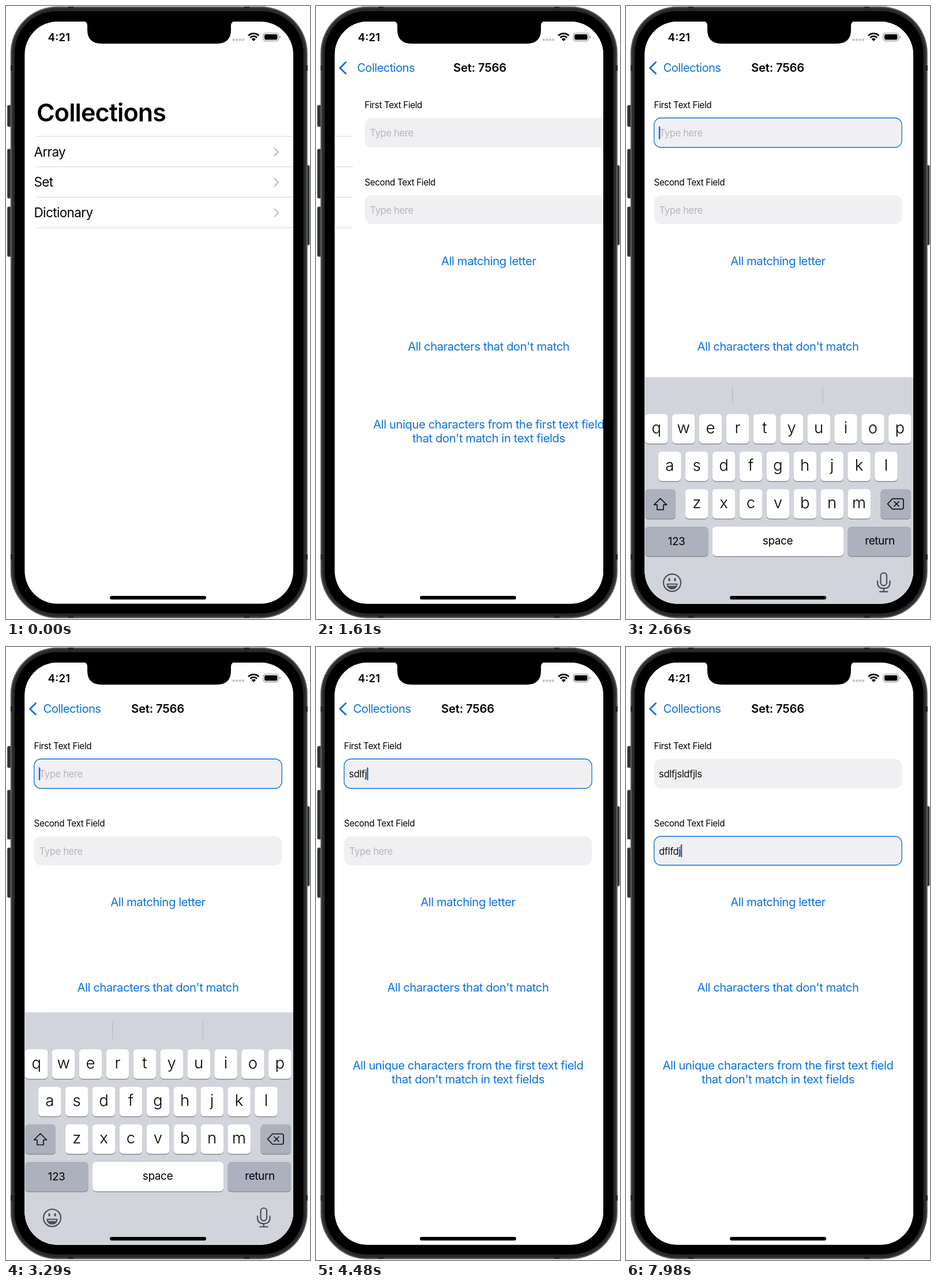
Animation, 527 px wide and 1062 px high, one loop 8 s. Source, as an HTML page:

```html
<!DOCTYPE html>
<html lang="en">
<head>
<meta charset="utf-8">
<title>Collections app</title>
<style>
  html, body { margin: 0; width: 100%; height: 100%; overflow: hidden; background: #fff; }
  svg { display: block; width: 100vw; height: 100vh; }
  text { font-family: Inter, "Liberation Sans", sans-serif; letter-spacing: -.022em; white-space: pre; }
  .blue { fill: #0a72e0; }
  .link { font-size: 20.3px; text-anchor: middle; }
  .row { font-size: 22.5px; letter-spacing: -.028em; }
  .label { font-size: 15.2px; }
  .entry { font-size: 16.6px; fill: #111; }
  .hint { font-size: 16.6px; fill: #b6b6ba; }
  .key { font-size: 27.5px; font-weight: 300; text-anchor: middle; letter-spacing: 0; }
  .word { font-size: 19px; text-anchor: middle; }
  .line { fill: none; stroke-linecap: round; stroke-linejoin: round; }
</style>
</head>
<body>
<svg id="stage" viewBox="0 0 527 1062" preserveAspectRatio="none"></svg>
<script>
const LOOP = 8000, STEP = 70;
const rect = (x, y, w, h, r, attrs) =>
  `<rect x="${x}" y="${y}" width="${w}" height="${h}" rx="${r}" ${attrs}/>`;
const text = (x, y, cls, str, attrs = '') =>
  `<text x="${x}" y="${y}" class="${cls}" ${attrs}>${str}</text>`;
const line = (d, color, width) =>
  `<path class="line" d="${d}" stroke="${color}" stroke-width="${width}"/>`;

function body() {
  const button = (x, y, h) => rect(x, y, 7, h, 2, 'fill="#2d3032" stroke="#55585a" stroke-width="1"');
  const band = (x, y, w, h) => rect(x, y, w, h, 0, 'fill="#242628"');
  return button(2.5, 172, 37) + button(2.5, 248, 85) + button(2.5, 348, 86) + button(519, 276, 138) +
    rect(8.5, 1.5, 513.5, 1058.5, 80, 'fill="#3b3d3f" stroke="#66696b" stroke-width="1.5"') +
    rect(11, 4, 508.5, 1053.5, 77, 'fill="#28292b"') +
    band(108, 1, 9, 6) + band(413, 1, 9, 6) + band(108, 1054, 9, 6) + band(413, 1054, 9, 6) +
    band(8, 103, 6, 9) + band(517, 103, 6, 9) + band(8, 950, 6, 9) + band(517, 950, 6, 9) +
    rect(15, 9, 500.5, 1043.5, 72, 'fill="#000"');
}

function list() {
  let s = text(53, 199.8, '', 'Collections',
    'id="big" font-size="43" font-weight="600" style="letter-spacing:-.02em"');
  ['Array', 'Set', 'Dictionary'].forEach((name, i) => {
    const y = 252.5 + i * 52.8;
    s += text(48.5, y + 8, 'row', name) + line(`M465.5 ${y - 6.2}l6.4 6.4l-6.4 6.4`, '#bfbfc2', 2.2);
  });
  for (let i = 0; i < 4; i++) s += rect(53, 225.2 + i * 52.7, 460, 1.3, 0, 'fill="#dcdcdd"');
  return s;
}

function page() {
  const field = (i, y, h) =>
    rect(48.7, y, 429.5, h, 12, `id="box${i}" fill="#f0f0f2" stroke="#0a72d6" stroke-width="1.3"`) +
    text(57.5, y + 32, 'hint', 'Type here', `id="hint${i}"`) +
    text(57, y + 31.7, 'entry', '', `id="entry${i}"`);
  return rect(28, 27, 475, 1010, 0, 'fill="#fff"') +
    text(48.5, 176.5, 'label', 'First Text Field') + field(0, 194, 51) +
    text(48.5, 310.5, 'label', 'Second Text Field') + field(1, 328, 50) +
    rect(56.8, 208.5, 2.5, 22.5, 1.2, 'id="caret" fill="#2b60d4"') +
    [[449, 'All matching letter'], [597, "All characters that don't match"],
     [732, 'All unique characters from the first text field'],
     [756, "that don't match in text fields"]]
      .map(([y, str]) => text(263.5, y, 'link blue', str)).join('');
}

function nav() {
  return line('M51.5 97.5L41.5 107.3L51.5 117', '#0a72e0', 2.9) +
    text(64.5, 114, 'blue', 'Collections', 'id="back" font-size="20.3" style="letter-spacing:-.03em"') +
    text(217, 114, '', 'Set: 7566',
      'id="title" font-size="20.3" font-weight="600" style="letter-spacing:-.01em"');
}

function keyboard() {
  const key = (x, y, w, fill = '#fff') =>
    rect(x, y + 1.4, w, 51, 6, 'fill="#8b8e94"') + rect(x, y, w, 51, 6, `fill="${fill}"`);
  const grey = '#adb1be', pitch = 46.9;
  let s = rect(28, 643, 475, 480, 0, 'fill="#d1d4da"') +
    rect(184, 659, 1.2, 30, 0, 'fill="#b6bac2"') + rect(340.5, 659, 1.2, 30, 0, 'fill="#b6bac2"');
  [['qwertyuiop', 33], ['asdfghjkl', 56], ['zxcvbnm', 103]].forEach(([row, x0], r) => {
    [...row].forEach((c, i) => {
      const x = x0 + i * pitch, y = 707 + r * 65;
      s += key(x, y, 39.5) + text(x + 19.7, y + 32.5, 'key', c);
    });
  });
  s += key(33, 837, 53, grey) + key(441.5, 837, 52.5, grey) +
    key(33, 902, 109.5, grey) + key(150, 902, 227) + key(384.5, 902, 109.5, grey) +
    text(87.5, 934, 'word', '123') + text(263, 932.5, 'word', 'space') + text(440, 932.5, 'word', 'return');
  s += line('M59.5 853L70.5 864H65V872.5H54V864H48.5Z', '#111', 1.7) +
    line('M462 853.5H478Q481 853.5 481 856.5V868.5Q481 871.5 478 871.5H462L453.5 862.5Z' +
      'M465 858.5L473 866.5M473 858.5L465 866.5', '#111', 1.7);
  return s;
}

function dock() {
  return '<g fill="none" stroke="currentColor" stroke-width="2.2" stroke-linecap="round" stroke-linejoin="round">' +
    '<circle cx="80" cy="999" r="15"/>' +
    '<path fill="currentColor" d="M71.5 1001.5H88.5Q87.5 1009.5 80 1009.5T71.5 1001.5Z"/>' +
    '<path stroke="#d1d4da" stroke-width="2" d="M74 1003.5H86"/>' +
    '<path stroke-width="3.2" d="M75 992.5V995M85 992.5V995"/>' +
    '<rect x="441.5" y="982" width="10.5" height="22" rx="5.2"/>' +
    '<path d="M436 996V999Q436 1009 446.8 1009T457.5 999V996M446.8 1009V1014.5M440 1014.5H453.5"/></g>';
}

function status() {
  let s = text(72.5, 60.5, '', '4:21', 'font-size="19" font-weight="600" style="letter-spacing:0"');
  for (let i = 0; i < 4; i++) s += `<circle cx="${394.7 + i * 5.4}" cy="58.5" r="2.2" fill="#c5c5c7"/>`;
  return s + '<path d="M429.3 61l-3.6-3.8a5.2 5.2 0 0 1 7.2 0z"/>' +
    '<path fill="none" stroke="#000" stroke-width="2.7" d="M423.4 54.8a8.3 8.3 0 0 1 11.8 0M420.2 51.4a12.9 12.9 0 0 1 18.2 0"/>' +
    rect(446, 47, 26.5, 13.6, 4, 'fill="none" stroke="#8e8e90" stroke-width="1.2"') +
    rect(448, 49, 22.5, 9.6, 2.4, '') +
    '<path d="M474.3 51.5q2 .8 2 2.3t-2 2.3z" fill="#8e8e90"/>';
}

const stage = document.getElementById('stage');
stage.innerHTML =
  `<defs><clipPath id="screen">${rect(32.4, 27, 465.6, 1008.6, 57, '')}</clipPath></defs>` + body() +
  '<g clip-path="url(#screen)">' + rect(32, 27, 467, 1010, 0, 'fill="#fff"') +
  `<g id="list">${list()}</g><g id="page">${page()}</g><g id="nav">${nav()}</g>` +
  `<g id="keys">${keyboard()}</g><g id="dock">${dock()}</g></g>` + status() +
  '<path d="M135 26.5Q141 27.5 141 34V41Q141 65.2 166 65.2H365Q390 65.2 390 41V34Q390 27.5 396 26.5Z"/>' +
  rect(180, 1022, 167, 6.2, 3.1, '');

const el = {};
stage.querySelectorAll('[id]').forEach(n => el[n.id] = n);
const shift = (n, x, y = 0) => n.setAttribute('transform', `translate(${x} ${y})`);
const clamp = v => Math.max(0, Math.min(1, v));

// critically damped spring from 0 to 1
function spring(ms, rate) {
  const x = Math.max(0, ms) / 1000 * rate;
  return x > 7 ? 1 : 1 - (1 + x) * Math.exp(-x);
}

const PUSH = 1309, FOCUS = 2310, SHOW = 2364, HIDE = 4019.5, SWITCH = 6510;
const typing = [
  { str: 'sdlfjsldfjls', at: [4200, 4270, 4340, 4410, 4480, 4550, 4620, 4690, 4760, 4900, 5040, 5320] },
  { str: 'dflfdj', at: [7350, 7490, 7630, 7700, 7840, 7980] }
];
// caret blink: time, opacity it fades to
const blink = [[2310, 1], [2800, 0], [3080, 1], [3710, 0], [4200, 1], [5600, 0],
  [5950, 1], [6300, 0], [6510, 1], [6930, 0], [7140, 1]];

function caretAlpha(t) {
  let a = 0;
  for (const [at, to] of blink) if (t >= at) a += (to - a) * clamp((t - at + STEP) / 140);
  return a;
}

function draw(t) {
  const push = spring(t - PUSH, 14), rest = 1 - push;
  shift(el.list, -168 * push);
  el.big.setAttribute('opacity', clamp(1.05 - 1.2 * push));
  shift(el.page, 465 * rest);
  el.page.setAttribute('visibility', push ? 'visible' : 'hidden');
  el.nav.setAttribute('opacity', clamp(push * 2));
  shift(el.back, 86 * rest);
  shift(el.title, 273 * rest);

  const active = t < FOCUS ? -1 : t < SWITCH ? 0 : 1;
  typing.forEach(({ str, at }, i) => {
    const typed = str.slice(0, at.filter(k => t >= k).length);
    const entry = el['entry' + i];
    if (entry.textContent !== typed) entry.textContent = typed;
    el['hint' + i].setAttribute('opacity', typed ? 0 : 1);
    el['box' + i].setAttribute('stroke-opacity', i === active ? 1 : 0);
    if (i === active) shift(el.caret, typed ? entry.getComputedTextLength() : 0, i * 133.3);
  });
  el.caret.setAttribute('opacity', caretAlpha(t));

  const hide = spring(t - HIDE, 18.8), up = spring(t - SHOW, 18.8) - hide;
  const y = 392 - 402 * up, seen = up > 0 ? 'visible' : 'hidden';
  shift(el.keys, 0, y);
  shift(el.dock, 0, hide ? -10 : y);
  el.dock.setAttribute('color', hide ? '#0c0c0e' : '#4b4f55');
  el.dock.setAttribute('opacity', clamp(1.5 - hide * 2.6));
  el.keys.setAttribute('visibility', seen);
  el.dock.setAttribute('visibility', seen);
}

const start = performance.now();
function tick() {
  const t = (performance.now() - start) % LOOP;
  draw(Math.floor(t / STEP) * STEP);
  requestAnimationFrame(tick);
}
tick();
</script>
</body>
</html>
```
